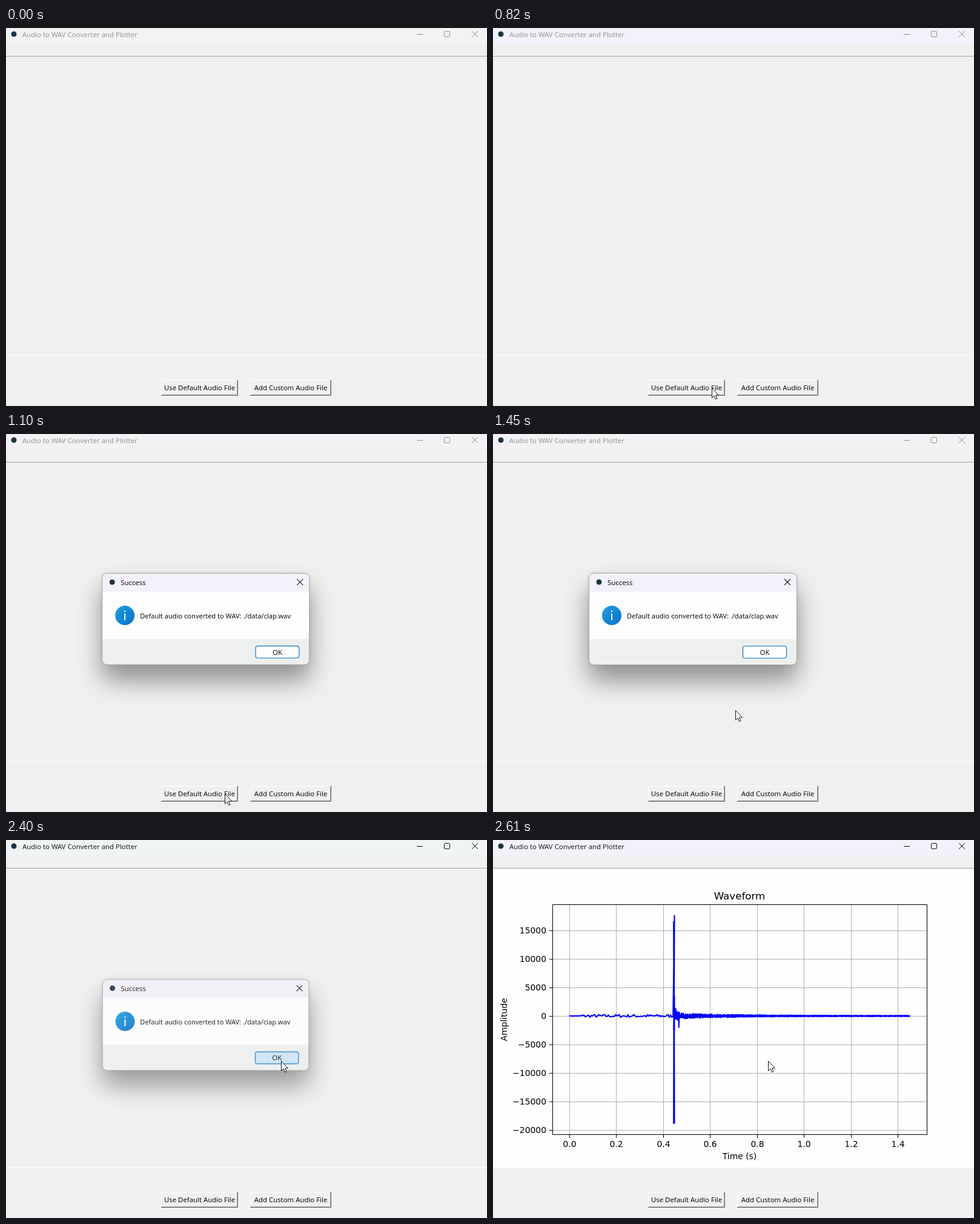
Animation of 794 by 623 pixels, one loop 3540 ms. Source, as an HTML page:

```html
<!DOCTYPE html>
<html lang="en">
<head>
<meta charset="utf-8">
<title>Audio to WAV Converter and Plotter</title>
<style>
  html, body { margin: 0; width: 100%; height: 100%; overflow: hidden; background: #f0f0f0; }
  svg { display: block; }
  text { font: 11.45px "Open Sans", "Noto Sans", sans-serif; }
  #plot text { font: 13.9px "DejaVu Sans", sans-serif; }
  #plot .heading { font-size: 16.67px; }
  .mid { text-anchor: middle; }
  .end { text-anchor: end; }
  .line { fill: none; stroke: currentColor; }
  #dialog { transform-origin: 272px 284px; }
  #panel { filter: drop-shadow(0 25px 21px rgba(0, 0, 0, .38)) drop-shadow(0 0 3px rgba(0, 0, 0, .12)); }
</style>
</head>
<body>
<svg width="794" height="623" viewBox="0 0 794 623">
  <defs>
    <linearGradient id="blue" x2="1" y2="1">
      <stop stop-color="#1c9fe4"/><stop offset="1" stop-color="#0a70c6"/>
    </linearGradient>
  </defs>
  <rect width="794" height="623" fill="#f0f0f0"/>
  <rect id="bar" width="794" height="26"/>
  <circle cx="13" cy="10" r="4.5" fill="#1d3344"/>
  <g id="caption">
    <text x="27" y="15" fill="currentColor">Audio to WAV Converter and Plotter</text>
    <path class="line" d="M678 10.5h10M769 5l10 10m0-10l-10 10"/>
    <rect class="line" x="723.5" y="5.5" width="9" height="9" rx="1"/>
  </g>
  <path d="M0 46.5h794" stroke="#a0a0a0"/>
  <path d="M0 539.5h794" stroke="#fff"/>
  <g id="plot"></g>
  <g id="buttons"></g>
  <g id="dialog">
    <g id="panel"><rect x="158.5" y="229.5" width="343" height="151" rx="8" fill="#eef0f0"/></g>
    <path d="M159 260v-22q0-8 8-8h326q8 0 8 8v22z" fill="#f3f1f9"/>
    <rect x="159" y="260" width="342" height="78" fill="#fefefe"/>
    <rect x="158.5" y="229.5" width="343" height="151" rx="8" fill="none" stroke="#a6a6a6"/>
    <circle cx="175" cy="244" r="4.5" fill="#1d3344"/>
    <text x="189" y="249">Success</text>
    <path d="M481 239l10 10m0-10l-10 10" stroke="#222" stroke-width="1.2"/>
    <circle cx="196" cy="299" r="16" fill="url(#blue)"/>
    <path d="M196 291v2.4M196 296v11" stroke="#fff" stroke-width="2"/>
    <text x="221" y="304" style="font-size:11.15px">Default audio converted to WAV: ./data/clap.wav</text>
    <rect id="ok" x="412.5" y="349.5" width="72" height="20" rx="3.5" stroke="#0a78c8" stroke-width="1.2"/>
    <text class="mid" x="448.5" y="364">OK</text>
  </g>
  <path id="cursor" d="M.5.5v16l3.6-3.4 2.5 5.6 2.4-1-2.5-5.5h5z" fill="#fff" stroke="#111"/>
</svg>
<script>
const LOOP = 3540;
const $ = id => document.getElementById(id);

// Bevelled push button; sunken swaps the light and dark edges.
function button(x, width, label, sunken) {
  const [light, dark] = sunken ? ["#696969", "#fff"] : ["#fff", "#696969"];
  const inner = sunken ? "#e3e3e3" : "#a0a0a0", shift = sunken ? 1 : 0;
  return `<path d="M${x + .5} 605V580.5h${width - 1}" fill="none" stroke="${light}"/>
    <path d="M${x + width - 1.5} 581v23.5H${x + 1}" fill="none" stroke="${inner}"/>
    <path d="M${x + width - .5} 580v25.5H${x}" fill="none" stroke="${dark}"/>
    <text class="mid" x="${x + width / 2 + shift}" y="${597 + shift}">${label}</text>`;
}

const plotX = seconds => 126 + seconds * 387.4;
const plotY = level => 290 - level * .0094;

function waveform() {
  let seed = 7;
  const random = () => (seed = seed * 16807 % 2147483647) / 2147483647;
  const points = [];
  const add = (s, level) => points.push(plotX(s).toFixed(2) + " " + plotY(level).toFixed(2));
  for (let s = 0; s < .443; s += .0052) {
    const size = s < .05 ? 30 : 270;
    add(s, (random() * 2 - 1) * size);
  }
  for (const level of [17600, -18800, 14000, -18800, 16500, -15800, 3400, -2500, 2200]) {
    add(.4445 + points.length % 3 * .0017, level);
  }
  for (let s = .451, sign = 1; s < 1.451; s += .0013, sign = -sign) {
    const size = 90 + 420 * Math.exp(-(s - .45) / .24) + 1000 * Math.exp(-(s - .45) / .012);
    add(s, sign * size * (.3 + .7 * random()));
    if (Math.abs(s - .467) < .0007) add(s, -2000);
  }
  return "M" + points.join("L");
}

function drawPlot() {
  let grid = "", ticks = "", labels = "";
  for (let i = 0; i < 8; i++) {
    const x = Math.round(plotX(i * .2)) + .5;
    grid += `M${x} 107v378`;
    ticks += `M${x} 486v5`;
    labels += `<text class="mid" x="${x}" y="506">${(i * .2).toFixed(1)}</text>`;
  }
  for (let level = -20000; level <= 15000; level += 5000) {
    const y = Math.round(plotY(level)) + .5;
    grid += `M99 ${y}h617`;
    ticks += `M98 ${y}h-5`;
    labels += `<text class="end" x="88" y="${y + 4.5}">${String(level).replace("-", "\u2212")}</text>`;
  }
  $("plot").innerHTML = `<rect y="47" width="794" height="493" fill="#fefefe"/>
    <path d="${grid}" stroke="#b0b0b0"/><path d="${ticks}" stroke="#000"/>
    <path d="${waveform()}" fill="none" stroke="#00f" stroke-width="2.08" stroke-linejoin="round"/>
    <rect x="98.5" y="106.5" width="618" height="379" fill="none" stroke="#000"/>${labels}
    <text class="mid heading" x="407" y="98">Waveform</text>
    <text class="mid" x="407" y="526">Time (s)</text>
    <text class="mid" transform="translate(23 296) rotate(-90)">Amplitude</text>`;
}

// Progress from 0 to 1, advancing in equal held steps; the first falls on start.
function stepped(t, start, end, count) {
  if (t < start) return 0;
  const done = Math.floor((t - start + 5) / (end - start) * (count - 1)) + 1;
  return Math.min(1, done / count);
}
const mix = (a, b, p) => a + (b - a) * p;
const easeOut = (p, power) => 1 - (1 - p) ** power;

// Last row whose time has passed.
const held = (rows, t) => rows.filter(row => row[0] <= t).pop();

function cursorAt(t) {
  const enter = stepped(t, 70, 480, 7);
  const rise = stepped(t, 1240, 1730, 8);
  const reach = stepped(t, 1800, 2070, 5);
  if (reach) return [mix(438, 454, reach), mix(385, 364, easeOut(reach, 1.5))];
  if (rise) return [mix(361, 438, rise), mix(593, 385, easeOut(rise, 1.57))];
  return [mix(442, 361, easeOut(enter, 1.6)), mix(623, 593, easeOut(enter, 1.6))];
}

// Rows of time, opacity, scale.
const dialogSteps = [
  [0, 0, 1], [890, .5, .94], [960, .96, .977], [1030, 1, .991], [1100, 1, .997], [1170, 1, 1],
  [2400, .88, .993], [2470, .45, .965], [2540, .1, .93], [2610, 0, 1]
];
const barSteps = [[0, "#f3f3f3"], [680, "#f3f1f9"], [890, "#f2f2f5"], [2340, "#f1f4f4"], [2540, "#f3f1f9"]];

let wasSunken;
function render(t) {
  const [x, y] = cursorAt(t);
  $("cursor").setAttribute("transform", `translate(${Math.round(x)} ${Math.round(y)})`);

  const [, opacity, scale] = held(dialogSteps, t);
  $("dialog").style.opacity = opacity;
  $("dialog").style.transform = `scale(${scale})`;
  $("dialog").style.display = opacity ? "" : "none";
  $("ok").setAttribute("fill", t >= 2270 ? "#cce4f7" : t >= 1800 && y < 370 ? "#e0eef9" : "#fdfdfd");

  const active = t >= 680 && t < 820 || t >= 2340;
  $("caption").style.color = active ? "#111" : "#8f8f8f";
  $("bar").setAttribute("fill", held(barSteps, t)[1]);
  $("plot").style.display = t >= 2610 ? "" : "none";

  const sunken = t >= 680 && t < 820;
  if (sunken !== wasSunken) {
    $("buttons").innerHTML = button(256, 127, "Use Default Audio File", sunken) +
      button(403, 134, "Add Custom Audio File", false);
    wasSunken = sunken;
  }
}

drawPlot();
const begin = performance.now();
function tick() {
  render((performance.now() - begin) % LOOP);
  requestAnimationFrame(tick);
}
tick();
</script>
</body>
</html>
```
